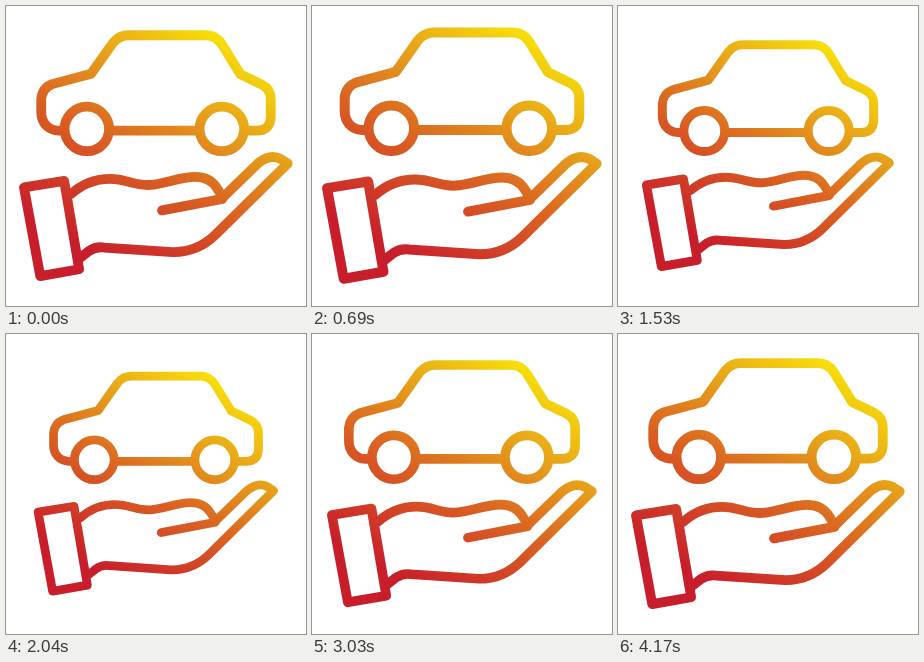
An HTML page that plays this animation: 300 px wide and 300 px high, repeating every 4200 ms.

```html
<!DOCTYPE html>
<html lang="en">
<head>
<meta charset="utf-8">
<title>Car care</title>
<style>
html, body { margin: 0; width: 100%; height: 100%; overflow: hidden; background: #fff; }
svg { display: block; width: 100%; height: 100%; }
</style>
</head>
<body>
<svg viewBox="0 0 300 300">
  <linearGradient id="warm" gradientUnits="userSpaceOnUse" x1="80" y1="275" x2="222" y2="38">
    <stop offset=".1" stop-color="#c81e2b"/>
    <stop offset=".48" stop-color="#da6222"/>
    <stop offset=".74" stop-color="#e6a01a"/>
    <stop offset="1" stop-color="#f7dd0b"/>
  </linearGradient>
  <g id="icon" fill="none" stroke="url(#warm)" stroke-width="9.8" stroke-linecap="round" stroke-linejoin="round">
    <!-- car -->
    <path d="M58 124.500H52C42 124 35 117 35 106V93Q36 82 46 78L85 67.500L107 36.500Q113 29 123 29H200Q210 29 216 38L234.500 68L256 78.500Q265 83 265 93V110Q265 124 252 124.500H239M103 124.500H193"/>
    <circle cx="80.700" cy="122.900" r="22.300"/>
    <circle cx="216" cy="122.900" r="22.300"/>
    <!-- cuff and hand -->
    <path d="M17.700 181.500L58 175L73 263.500L34 270.300Z"/>
    <path d="M65 188Q82 173 104 173C121 173 128 180 144 179C159 178 174 171 189 171Q204 171 211 182Q215 187 216.500 193L156 204.500"/>
    <path d="M217 191.500L252 157.500Q264 147.500 275 153L282 157.500L209 229.500C197 241 184 246.500 167 246.300L98 241.700Q90 240.500 83 245L74 252"/>
  </g>
</svg>
<script>
const LOOP = 4200;
// [time, scale] stops of the pulse, joined by a smooth periodic curve
const stops = [[0, .998], [280, 1.012], [600, 1.024], [1110, .959], [1650, .91], [2070, .891],
  [2730, .948], [3240, 1.007], [3500, 1.017], [3850, 1.006]];
const count = stops.length;

function stop(i) {
  const [t, s] = stops[(i + count) % count];
  return [t + LOOP * Math.floor(i / count), s];
}

function slope(i) {
  const [t0, a] = stop(i - 1), [, b] = stop(i), [t2, c] = stop(i + 1);
  if ((b - a) * (c - b) <= 0) return 0;
  return (c - a) / (t2 - t0);
}

function scaleAt(t) {
  let i = count - 1;
  while (stops[i][0] > t) i--;
  const [t0, a] = stop(i), [t1, b] = stop(i + 1);
  const d = t1 - t0, p = (t - t0) / d, q = 1 - p;
  return q * q * (1 + 2 * p) * a + p * p * (3 - 2 * p) * b
    + d * p * q * (q * slope(i) - p * slope(i + 1));
}

const icon = document.getElementById("icon");
const start = performance.now();

function draw() {
  const t = (performance.now() - start) % LOOP;
  icon.setAttribute("transform", `translate(150 150) scale(${scaleAt(t)}) translate(-150 -150)`);
  requestAnimationFrame(draw);
}
draw();
</script>
</body>
</html>
```
